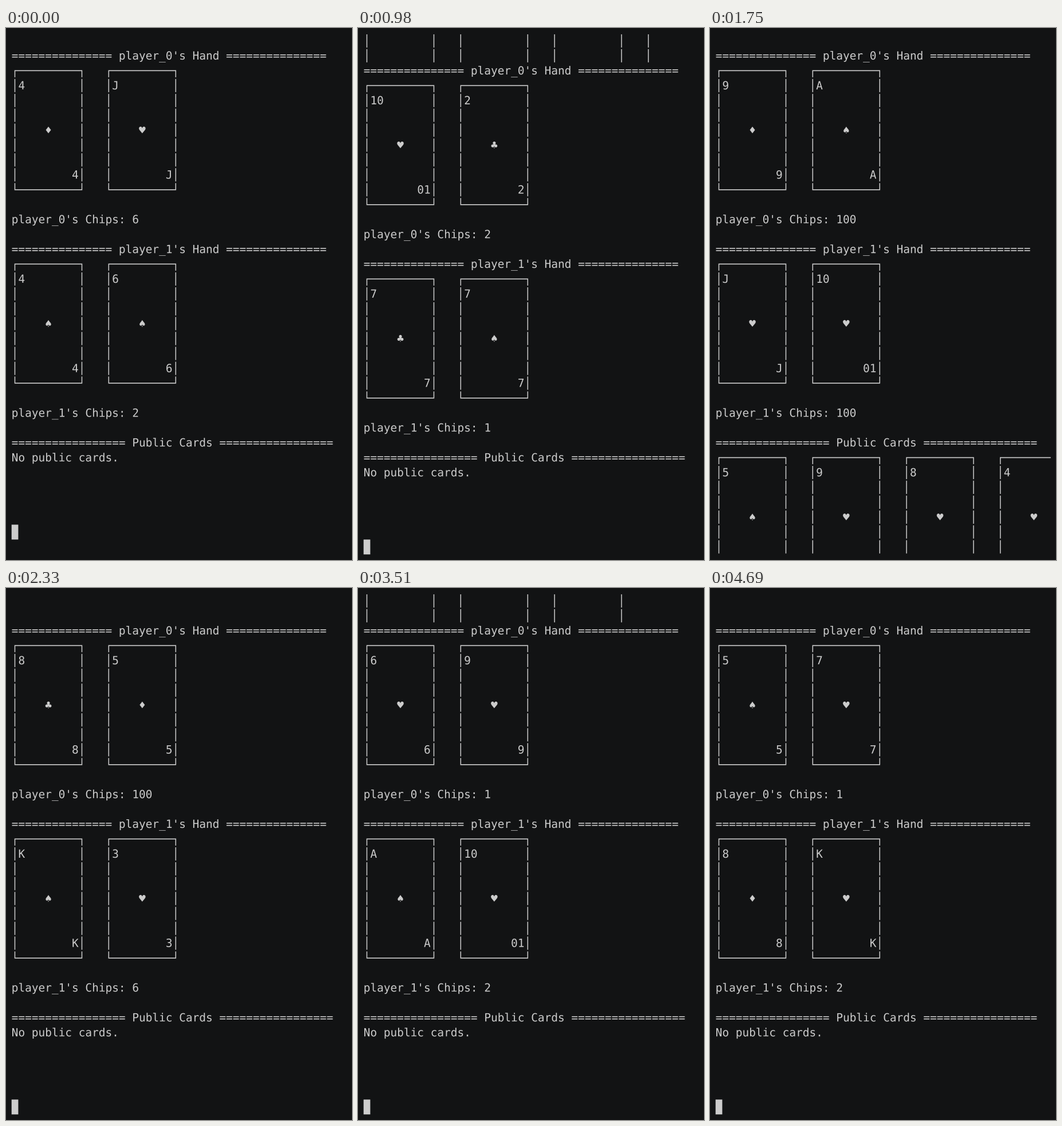
Write an HTML page with a canvas that moves like this. It is 604 px wide and 927 px high and loops after 5690 ms.

```html
<!DOCTYPE html>
<html lang="en">
<head>
<meta charset="utf-8">
<title>Card table terminal</title>
<style>
  html, body { margin: 0; width: 100%; height: 100%; overflow: hidden; background: #121314; }
  canvas { display: block; width: 604px; height: 927px; }
</style>
</head>
<body>
<canvas id="stage" width="604" height="927"></canvas>
<script>
const W = 604, H = 927, LOOP = 5690;
const STEP = 195, LEAD = 10;
const COLS = 50, ROWS = 35;
const BG = '#121314', FG = '#cccccc';

// Terminal layout in its own units, scaled to the stage
const FONT = 24, CELL = FONT * 0.60205, LINE = FONT * 4 / 3, PAD = 12;
const TERM_W = 746, TERM_H = 1144;
const SS = 4; // supersampling keeps glyphs at fractional positions

// Cards (two per player, then public), big blind seat, moves shown one step at a time
const hands = [
  ['4♦ J♥ 4♠ 6♠ Q♦ 7♣ 2♥ 9♠', 1, '0 1cf t 1 ab'],
  ['10♥ 2♣ 7♣ 7♠', 0, '- 1'],
  ['9♦ A♠ J♥ 10♥ 5♠ 9♥ 8♥ 4♥', 1, '- x abft'],
  ['8♣ 5♦ K♠ 3♥', 0, '- 1 a'],
  ['J♦ 7♠ 6♣ 2♠', 1, '-'],
  ['Q♣ 4♣ 2♦ J♠ 8♠ 3♦ K♥', 0, '- x 01 cf'],
  ['6♥ 9♥ A♠ 10♥ 6♣ 10♠ K♠ 8♣', 1, '- cf t -'],
  ['3♣ Q♠ 9♣ 5♥', 0, '-'],
  ['K♦ 6♦ 4♥ A♣', 1, '-'],
  ['5♠ 7♥ 8♦ K♥', 1, '-']
];

const moves = {
  '-': () => {},
  0: s => s.chips[0] = 2 * Math.max(...s.chips) + 2,
  1: s => s.chips[1] = 2 * Math.max(...s.chips) + 2,
  a: s => s.chips[0] = 100,
  b: s => s.chips[1] = 100,
  c: s => s.chips.fill(Math.max(...s.chips)),
  x: s => s.chips.fill(2 * Math.max(...s.chips)),
  f: s => s.shown = 3,
  t: s => s.shown = 4
};

function play([cards, big, script]) {
  const s = { cards: cards.split(' '), chips: [2 - big, 1 + big], shown: 0 };
  return script.split(' ').map(step => {
    for (const m of step) moves[m](s);
    return { ...s, chips: [...s.chips] };
  });
}

const states = hands.flatMap(play);

const BLANK = '│' + ' '.repeat(9) + '│';

function cardLines(card) {
  const rank = card.slice(0, -1), suit = card.slice(-1);
  const flipped = [...rank].reverse().join('');
  const bar = '─'.repeat(9);
  return [
    `┌${bar}┐`, `│${rank.padEnd(9)}│`, BLANK, BLANK, `│    ${suit}    │`,
    BLANK, BLANK, `│${flipped.padStart(9)}│`, `└${bar}┘`
  ];
}

function sideBySide(cards) {
  const all = cards.map(cardLines);
  return all[0].map((_, row) => all.map(c => c[row]).join('   '));
}

function heading(text, n) {
  const rule = '='.repeat(n);
  return `${rule} ${text} ${rule}`;
}

function screen(i) {
  const { cards, chips, shown } = states[i];
  const before = i ? states[i - 1].shown : 0;
  const top = i === 0 || shown ? 1 : 2;
  // Rows scrolled over from the previous screen
  const lines = Array(top).fill(Array(before).fill(BLANK).join('   '));
  chips.forEach((n, p) => {
    lines.push(heading(`player_${p}'s Hand`, 15),
      ...sideBySide(cards.slice(2 * p, 2 * p + 2)),
      '', `player_${p}'s Chips: ${n}`, '');
  });
  lines.push(heading('Public Cards', 17));
  if (shown) lines.push(...sideBySide(cards.slice(4, 4 + shown)));
  else lines.push('No public cards.');
  const visible = lines.slice(0, ROWS).map(s => s.slice(0, COLS));
  const cursor = shown ? [visible[ROWS - 1].length, ROWS - 1] : [0, top + 32];
  return { lines: visible, cursor };
}

const ctx = document.getElementById('stage').getContext('2d');
const big = document.createElement('canvas');
big.width = W * SS;
big.height = H * SS;
const pen = big.getContext('2d');
pen.scale(big.width / TERM_W, big.height / TERM_H);

function draw(i) {
  const { lines, cursor: [cx, cy] } = screen(i);
  pen.fillStyle = BG;
  pen.fillRect(0, 0, TERM_W, TERM_H);
  pen.fillStyle = FG;
  pen.font = `${FONT}px "DejaVu Sans Mono", monospace`;
  lines.forEach((line, row) => {
    [...line].forEach((ch, col) => {
      if (ch !== ' ') pen.fillText(ch, PAD + col * CELL, PAD + row * LINE + FONT);
    });
  });
  if (cx < COLS) pen.fillRect(PAD + cx * CELL, PAD + cy * LINE, CELL, LINE);
  ctx.imageSmoothingQuality = 'high';
  ctx.drawImage(big, 0, 0, W, H);
}

const start = performance.now();
let current = -1;

function tick() {
  const t = (performance.now() - start) % LOOP;
  const i = Math.min(Math.floor((t + LEAD) / STEP), states.length - 1);
  if (i !== current) draw(current = i);
  requestAnimationFrame(tick);
}
tick();
</script>
</body>
</html>
```
